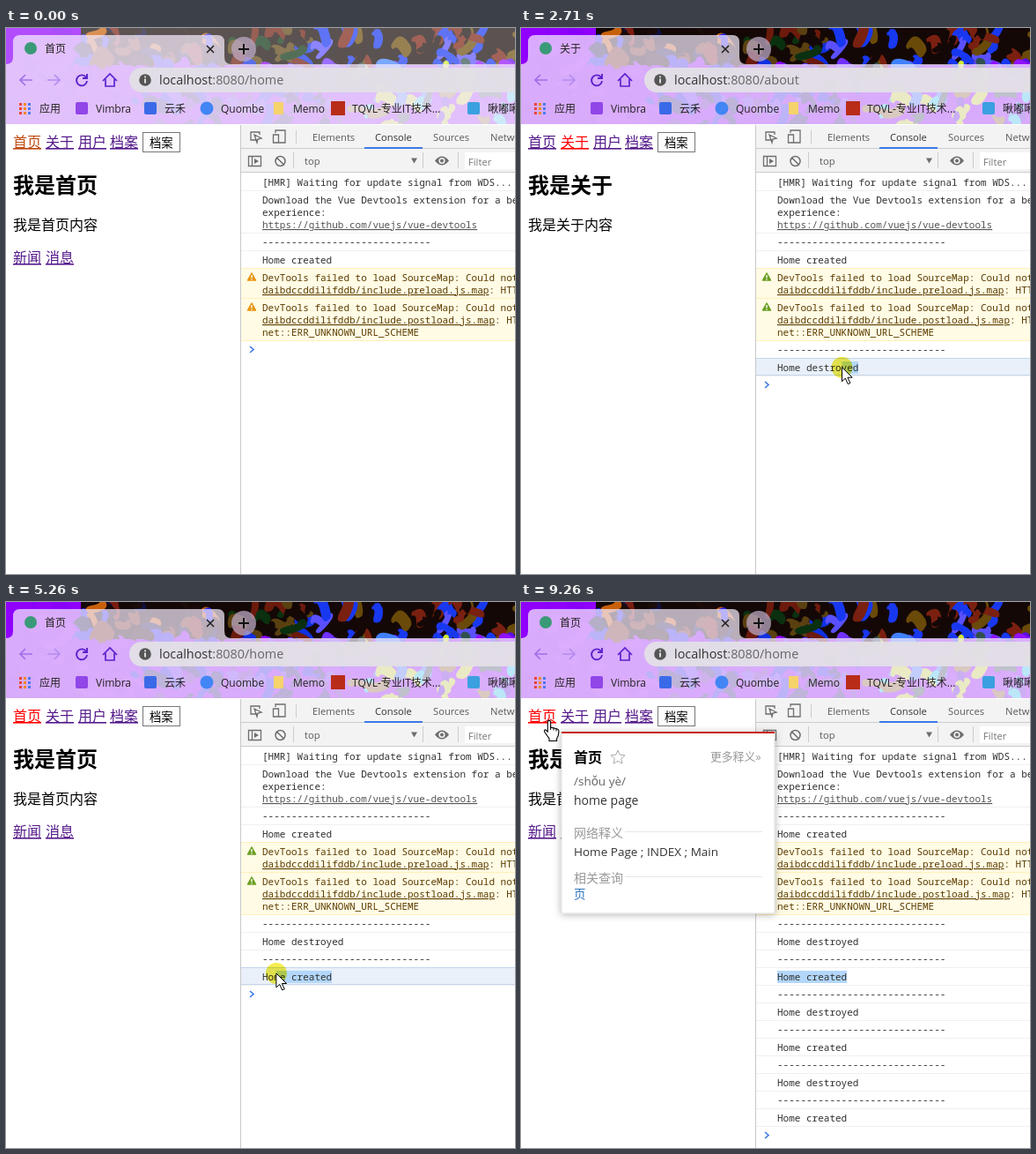
Recreate the animation shown at these times as an HTML page. Size 578x619 px, loop 9.97 s.

```html
<!DOCTYPE html>
<html lang="zh">
<meta charset="utf-8">
<style>
html, body { margin: 0; width: 578px; height: 619px; overflow: hidden; background: #fff }
svg { display: block }
text { font-family: 'Open Sans', 'Noto Sans CJK SC', 'Noto Sans CJK', sans-serif; white-space: pre }
.page text { font-family: 'Noto Sans CJK SC', 'Noto Sans CJK', sans-serif }
.mono text { font-family: 'Noto Sans Mono', monospace }
.link { text-decoration: underline }
#press { mix-blend-mode: multiply }
</style>
<svg id="stage" width="578" height="619" viewBox="0 0 578 619"></svg>
<script>
const LOOP = 9970;
const PURPLE = '#551a8b';

// Markup helpers
const text = (x, y, s, size = 16, fill = '#000', extra = '') =>
  `<text x="${x}" y="${y}" font-size="${size}" fill="${fill}" ${extra}>${s}</text>`;
const rect = (x, y, w, h, fill, extra = '') =>
  `<rect x="${x}" y="${y}" width="${w}" height="${h}" fill="${fill}" ${extra}/>`;
const circle = (x, y, r, fill, extra = '') => `<circle cx="${x}" cy="${y}" r="${r}" fill="${fill}" ${extra}/>`;
const line = (d, stroke, width = 1) => `<path d="${d}" fill="none" stroke="${stroke}" stroke-width="${width}"/>`;
const group = (id, body, extra = '') => `<g id="${id}" ${extra}>${body}</g>`;
const link = (x, y, s, fill = PURPLE, id = '') => text(x, y, s, 16, fill, `class="link" id="${id}"`);
const log = (y, s, fill = '#303030', extra = '') => text(291, y + 4, s, 11, fill, extra);

// Paint-splash browser theme
function splashes() {
  let seed = 11;
  const rnd = () => (seed = seed * 16807 % 2147483647) / 2147483647;
  const pick = (list) => list[Math.floor(rnd() * list.length)];
  const violet = ['#9000ff', '#8800f8', '#9808ff'];
  const warm = ['#1a0a08', '#7a1c10', '#2020f0', '#6b2a10', '#c8600a', '#101040'];
  const dark = ['#140806', '#140806', '#0a3010', '#6b1a0c', '#1030e0', '#5a4010'];
  const blue = ['#1838f0', '#1838f0', '#5a50ff', '#140806', '#6a4a08', '#7a2010'];
  const mid = ['#2a20f0', '#9000ff', '#6a20c0', '#9000ff', '#7030ff', '#302080'];
  const right = ['#20e0f0', '#d0e830', '#4080ff', '#5a10e0', '#305050', '#9010ff', '#907020'];
  const palette = (x, y) =>
    y < 42 ? (x < 85 ? violet : x < 250 ? warm : x < 340 ? dark : blue)
      : x < 150 ? violet : x < 400 ? mid : right;
  let out = rect(0, 0, 578, 109, '#9000ff') + rect(85, 0, 493, 42, '#140806');
  for (let i = 0; i < 340; i++) {
    const x = rnd() * 590, y = rnd() * 112;
    const rx = 5 + rnd() * 11, ry = 4 + rnd() * 7;
    out += `<path fill="${pick(palette(x, y))}" transform="translate(${x.toFixed()} ${y.toFixed()}) rotate(${(rnd() * 180).toFixed()}) scale(${rx.toFixed(1)} ${ry.toFixed(1)})" d="M-1 0Q-1-1 0-.8T1 0Q1.2 1 .3 .6T-.5 .8Q-1 1-1 0"/>`;
  }
  return out;
}

const tabShape = 'M0 41Q8 41 8 33V16Q8 8 16 8H240Q248 8 248 16V33Q248 41 256 41H578V109H0Z';
const bookmark = (x, s) => text(x, 96, s, 12, '#222');
const square = (x, fill) => rect(x, 84, 14, 14, fill, 'rx="2"');

function browser() {
  let dots = '';
  for (let i = 0; i < 9; i++)
    dots += rect(15 + i % 3 * 5, 85 + Math.floor(i / 3) * 5, 3, 3, ['#e8453c', '#f08a24', '#4a7af0'][i % 3]);
  return splashes() +
    group('dim', rect(0, 0, 578, 109, '#fff'), 'opacity=".3"') +
    `<path d="${tabShape}" fill="#f4ebfb" opacity=".73"/>` +
    circle(28, 23, 7, '#3a9a78') + text(44, 28, '', 12, '#222', 'id="title"') +
    line('M228 20l8 8m0-8l-8 8', '#222', 1.6) +
    circle(270, 24, 14, '#bba8c4', 'opacity=".75"') + line('M264 24h12M270 18v12', '#111', 2) +
    line('M30 59H16m6-6l-6 6 6 6', '#a070e8', 1.7) + line('M47 59h14m-6-6l6 6-6 6', '#b48cf0', 1.7) +
    line('M91 56a6 6 0 1 0 1 4M92 52v5h-5', '#5a22cc', 1.9) +
    line('M110 60l8-8 8 8M113 58v8h10v-8', '#5a22cc', 1.7) +
    rect(140, 45, 460, 28, '#e3e0e6', 'rx="14" opacity=".95"') +
    circle(158, 59, 6.8, '#555') + line('M158 57.5v5M158 54.5v1.7', '#fff', 1.6) +
    text(174, 64, '', 14.4, '#333', 'id="url"') +
    dots + bookmark(38, '应用') + square(79, '#9146e8') + bookmark(102, 'Vimbra') +
    square(157, '#3a6ae8') + bookmark(180, '云禾') + circle(228, 91, 7.5, '#4285f4') +
    bookmark(244, 'Quombe') + rect(304, 84, 11, 14, '#f6d36b', 'rx="1"') + bookmark(326, 'Memo') +
    rect(369, 83, 16, 16, '#b82c18') + bookmark(393, 'TQVL-专业IT技术...') +
    square(524, '#3aa0e0') + bookmark(547, '啾嘟啾');
}

function page() {
  return rect(0, 109, 578, 510, '#fff') +
    link(8, 135, '首页', PURPLE, 'homeLink') + link(45, 135, '关于', PURPLE, 'aboutLink') +
    link(82, 135, '用户') + link(118, 135, '档案') +
    rect(155.5, 118.5, 42, 22, '#fdfdfd', 'stroke="#777"') + text(163, 135, '档案', 13.3) +
    text(8, 187, '', 24, '#000', 'font-weight="bold" id="heading"') + text(8, 229, '', 16, '#000', 'id="body"') +
    group('news', link(8, 266, '新闻') + link(45, 266, '消息'));
}

const rule = (y, color = '#f0f0f0') => line(`M267 ${y}H578`, color);
const dashes = (y) => log(y - 1, '-'.repeat(29));
const mapRow = (y, name) => log(y, 'DevTools failed to load SourceMap: Could not load', '#5c3c00') +
  log(y + 14, `<tspan class="link">daibdccddilifddb/include.${name}.js.map</tspan>: HTTP`, '#5c3c00') +
  `<path class="warn" d="M279 ${y - 5}l4.500 8h-9z" stroke-width="1.5" stroke-linejoin="round"/>` +
  line(`M279 ${y - 3}v3.500M279 ${y + 1.5}v1.300`, '#fff', 1.4);

function devtools() {
  const tab = (x, s, fill = '#5a5a5a') => text(x, 128, s, 11.2, fill);
  const bar = rect(267, 110, 311, 53, '#f3f3f3') + rule(136.5, '#ccc') + rule(163.5, '#ccc') +
    line('M266.5 110V619', '#c8c8c8') +
    line('M286 127h-8v-9h10v3M282 121l8 4-4 1-1 4zM303.5 121v9h5M306 119v-3h11v14h-7M303.5 121h6v9h-6z', '#6e6e6e', 1.3) +
    line('M329.5 116v15M326.5 141v18M473.5 141v18M513.5 141v18', '#ccc') +
    tab(348, 'Elements') + tab(419, 'Console', '#333') + tab(485, 'Sources') + tab(550, 'Network') +
    rect(407, 135, 66, 2, '#3b78e7') +
    line('M275.5 145.5h14v11h-14zM279.5 145v12', '#6e6e6e', 1.3) + '<path d="M282 148l5 3-5 3z" fill="#6e6e6e"/>' +
    line('M307 146.5l9 9M317 151a5.5 5.5 0 1 1-11 0a5.5 5.5 0 1 1 11 0', '#6e6e6e', 1.5) +
    text(339, 155, 'top', 11.2, '#5a5a5a') + '<path d="M460 147.5h7l-3.5 6z" fill="#6e6e6e"/>' +
    '<path d="M487 150.5q8-10 16 0q-8 10-16 0" fill="#6e6e6e"/>' +
    circle(495, 150.5, 3.6, '#f3f3f3') + circle(495, 150.5, 2, '#6e6e6e') +
    rect(521, 141, 57, 19, '#fff') + text(525, 156, 'Filter', 11.2, '#777');
  const rows = log(175, '[HMR] Waiting for update signal from WDS...') +
    log(195, 'Download the Vue Devtools extension for a better') + log(209, 'experience:') +
    log(223, 'https://github.com/vuejs/vue-devtools', '#545454', 'class="link"') +
    dashes(243) + log(263, 'Home created') +
    rect(267, 273, 311, 82, '#fffbe5') + mapRow(283, 'preload') + mapRow(317, 'postload') +
    log(345, 'net::ERR_UNKNOWN_URL_SCHEME', '#5c3c00') +
    [184.5, 232.5, 252.5].map(y => rule(y)).join('') + [272.5, 306.5, 354.5].map(y => rule(y, '#fff0b8')).join('');
  const focus = (id, y) => group(id, rect(267, y - 10, 311, 19, '#e9f0f9') + rule(y - 10.5, '#c4d6ec') + rule(y + 8.5, '#c4d6ec'));
  const entryRows = (body) => Array.from({ length: 12 }, (_, i) => `<g class="entry">${body(365 + 20 * i, i)}</g>`).join('');
  return bar + group('rows', rows + entryRows(y => rule(y + 9.5)) + focus('focusA', 385) + focus('focusB', 425) +
    rect(291, 378, 0, 14, '#b3d7fb', 'id="selA"') + rect(291, 418, 0, 14, '#b3d7fb', 'id="selB"') +
    entryRows((y, i) => i % 2 ? log(y, 'Home ' + (i % 4 == 1 ? 'destroyed' : 'created')) : dashes(y)) +
    group('prompt', line('M277-3l4 3.5-4 3.5', '#3b78e7', 1.6)), 'class="mono"');
}

const star = (x, y) => `<path transform="translate(${x} ${y})" d="M0-8l2.3 5.2 5.7.6-4.3 3.8 1.3 5.6-5-3-5 3 1.3-5.6-4.3-3.8 5.7-.6z" fill="none" stroke="#aaa"/>`;
const card = (x, y, w, h) => rect(x, y, w, h, '#fff', 'stroke="#ddd" filter="url(#shadow)"');
const label = (y, x, s, end) => text(x, y, s, 14, '#999') + line(`M${x + 58} ${y - 6.5}H${end}`, '#e6e6e6');

function popups() {
  const words = ['king', 'wang', 'great', 'amir', 'roi'].map((s, i) => text(92, 221 + 21 * i, s, 14, '#333')).join('');
  const first = card(79, 109, 240, 267) + rect(79, 109, 240, 29, '#f7f7f7') + line('M79 138.5H319', '#e8e8e8') +
    rect(98, 117, 14, 14, '#dc2020') + text(122, 129, '取词', 11.5, '#999') + line('M155.5 118v13', '#ddd') +
    text(165, 129, '英汉互译', 12.3, '#555') + '<path d="M220 122h8l-4 4z" fill="#999"/>' +
    line('M239 118l8 7-3 1-3 4-6-6 4-2zM238 127l-5 5M258.5 121.5h8v8h-8zM261 121v-3h9v9h-3M281 119l10 10m0-10l-10 10', '#999', 1.1) +
    [119, 124, 129].map(y => circle(304, y, 1, '#999')).join('') +
    text(92, 173, '王', 16, '#000', 'font-weight="bold"') + star(126, 167) + text(247, 171, '更多释义»', 12.8, '#999') +
    text(92, 200, '/wàng,wáng/', 13.5, '#666') + words +
    label(342, 92, '网络释义', 306) + text(92, 363, 'NJ ; KING ; monarch', 13.5, '#333');
  const second = card(46, 148, 242, 205) + rect(46, 147, 242, 2, '#c81e1e') +
    text(60, 182, '首页', 16, '#000', 'font-weight="bold"') + star(110, 176) + text(215, 180, '更多释义»', 12.8, '#999') +
    text(60, 208, '/shǒu yè/', 13.5, '#666') + text(60, 230, 'home page', 14, '#333') +
    label(267, 60, '网络释义', 274) + text(60, 288, 'Home Page ; INDEX ; Main', 13.5, '#333') +
    label(318, 60, '相关查询', 274) + text(60, 336, '页', 13.5, '#2a72b8');
  return group('popup1', first) + group('popup2', second);
}

const pointer = circle(0, 0, 12, '#f6ee50', 'id="press"') + group('mouse',
  '<path id="arrow" d="M0 0v16l3.8-3.5 3 6.5 2.6-1.2-3-6.3h5.3z" fill="#fff" stroke="#000"/>' +
  group('hand', '<path d="M-1.7 1.5Q0-.8 1.7 1.5V8l7 1.8q2.3.7 2.3 3l-.8 5-1.600 3v2.700H0v-2.700l-5-7q-1.3-2.3.7-3l2.6 2.2z" fill="#fff" stroke="#000" stroke-width="1.1"/>' +
    line('M1.7 7v4M5 8.5v3M8 9.5v3', '#000')));

stage.innerHTML = `<defs><filter id="shadow" x="-20%" y="-20%" width="140%" height="140%">
  <feDropShadow dx="0" dy="1" stdDeviation="4" flood-opacity=".3"/></filter></defs>` +
  browser() + group('view', page(), 'class="page"') + devtools() + popups() + pointer;

// Timeline: [time, x, y] of the pointer tip
const path = [[70, 366, 486], [450, 76, 163], [620, 76, 163], [770, 62, 136], [1930, 62, 136], [2160, 344, 365],
  [2560, 383, 385], [2620, 383, 385], [2940, 318, 384], [3100, 289, 384], [3250, 289, 384], [3400, 237, 211],
  [4020, 23, 139], [4400, 23, 139], [4900, 370, 421], [4980, 370, 421], [5260, 307, 421], [5410, 292, 420],
  [5640, 292, 420], [6030, 50, 140], [6400, 50, 140], [6790, 37, 131], [6950, 25, 131], [7180, 25, 131],
  [7540, 56, 130], [7740, 56, 130], [8100, 18, 133], [8490, 18, 133], [8560, 32, 134]];
const presses = [[1000, 1150], [2600, 3100], [4170, 4300], [4980, 5400], [6180, 6300], [6950, 7060], [7500, 7600], [8110, 8220]];
const routes = [1460, 4250, 6330, 7020, 7560, 8180];
const entries = [1460, 1550, 4250, 4330, 6330, 6410, 7100, 7180, 7640, 7720, 8180, 8260];

const $ = (id) => document.getElementById(id);
const show = (el, on) => el.setAttribute('visibility', on ? 'visible' : 'hidden');
const within = (t, a, b) => t >= a && t < b;
const passed = (times, t) => times.filter(v => t >= v).length;

function pointAt(t) {
  const i = path.findIndex(p => p[0] > t);
  if (i < 0) return path.at(-1).slice(1);
  if (!i) return path[0].slice(1);
  const [a, b] = [path[i - 1], path[i]], k = (t - a[0]) / (b[0] - a[0]);
  return [a[1] + (b[1] - a[1]) * k, a[2] + (b[2] - a[2]) * k];
}

function select(el, right, x, on) {
  const left = Math.min(right, x < 296 ? 291 : x);
  el.setAttribute('x', left);
  el.setAttribute('width', on ? right - left : 0);
}

const warns = document.querySelectorAll('.warn');
const entryEls = document.querySelectorAll('.entry');

function draw(t) {
  const about = passed(routes, t) % 2, name = about ? '关于' : '首页';
  $('title').textContent = within(t, 1310, 1460) ? '关于' : name;
  $('url').innerHTML = 'localhost<tspan fill="#666">:8080/' + (about ? 'about' : 'home') + '</tspan>';
  $('heading').textContent = '我是' + name;
  $('body').textContent = '我是' + name + '内容';
  $('homeLink').setAttribute('fill', about ? PURPLE : t < 1000 ? '#c04a10' : '#f00');
  $('aboutLink').setAttribute('fill', about ? '#f00' : PURPLE);
  show($('news'), !about);
  show($('dim'), t < 1000);
  warns.forEach(w => ['fill', 'stroke'].forEach(k => w.setAttribute(k, t < 1460 ? '#e8940c' : '#6a9f20')));

  const count = passed(entries, t);
  entryEls.forEach((el, i) => show(el, i % entries.length < count));
  $('prompt').setAttribute('transform', `translate(0 ${364 + 20 * count})`);

  const [x, y] = pointAt(t);
  show($('focusA'), within(t, 2600, 4170));
  show($('focusB'), within(t, 4980, 6180));
  select($('selA'), 383, t < 3100 ? x : 291, within(t, 2600, 4980));
  select($('selB'), 370, t < 5410 ? x : 291, t >= 4980);

  show($('popup1'), within(t, 2010, 2560));
  show($('popup2'), t >= 9190);
  $('popup2').setAttribute('opacity', t < 9260 ? .5 : 1);

  const seen = t >= 70, hand = y < 147 && x < 152;
  for (const id of ['mouse', 'press'])
    $(id).setAttribute('transform', `translate(${x.toFixed(1)} ${y.toFixed(1)})`);
  show($('arrow'), seen && !hand);
  show($('hand'), seen && hand);
  show($('press'), presses.some(([a, b]) => within(t, a, b)));
}

const start = performance.now();
(function tick() {
  draw((performance.now() - start) % LOOP);
  requestAnimationFrame(tick);
})();
</script>
</html>
```
